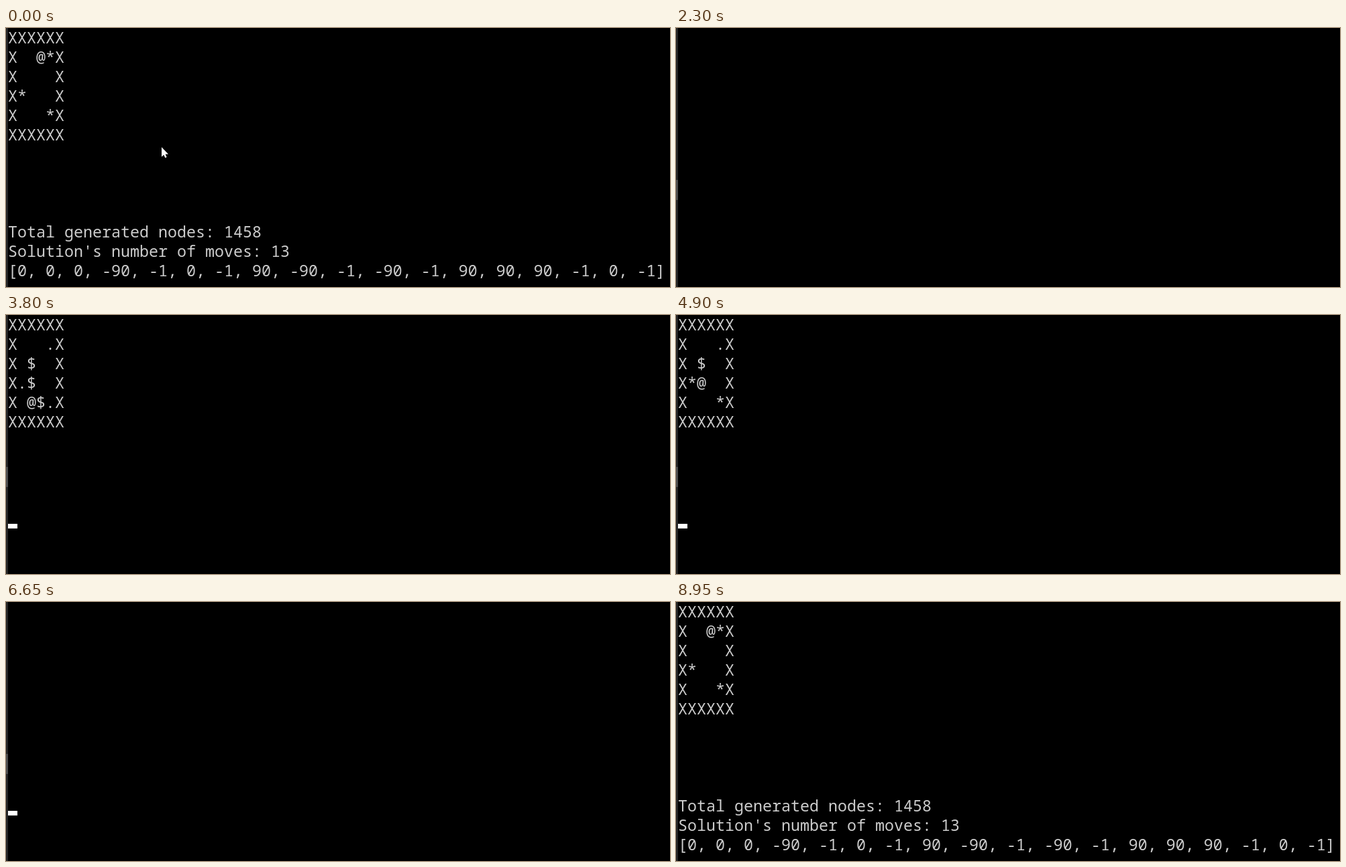
Recreate the animation shown at these times as an HTML page. Size 990x387 px, loop 9.1 s.

```html
<!DOCTYPE html>
<html lang="en">
<head>
<meta charset="utf-8">
<title>Box puzzle solver</title>
<style>
  html, body { margin: 0; width: 100%; height: 100%; overflow: hidden; background: #000; }
  svg { display: block; width: 990px; height: 387px; }
  text {
    font: 23.333px "Noto Sans Mono", "DejaVu Sans Mono", monospace;
    fill: #ccc;
    white-space: pre;
  }
</style>
</head>
<body>
<svg id="stage" viewBox="0 0 990 387">
  <rect width="990" height="387"/>
  <rect width="3" height="387" fill="#262626"/>
  <rect id="thumb" y="227" width="3" height="30" fill="#4d4d4d"/>
  <rect id="caret" x="3" y="312" width="14" height="7" fill="#fff"/>
  <g id="board"></g>
  <g id="report"></g>
  <path id="pointer" fill="#fff" d="M232 178V192.5L235.2 189.5L237.4 194L239.6 193L237.6 188.4H242Z"/>
</svg>
<script>
const LOOP = 9100;
const START = 2350;
const BLANKS = [2300, 3400, 4850, 5900, 6650];
const BLANK_LENGTH = 50;
const MOVES = [
  [2700, 'D'], [3050, 'D'], [3450, 'D'], [3800, 'R'], [4150, 'R'], [4500, 'U'],
  [4900, 'L'], [5250, 'U'], [5600, 'L'], [5950, 'U'], [6300, 'R'], [6700, 'R']
];
const STEP = { U: [0, -1], D: [0, 1], L: [-1, 0], R: [1, 0] };
const GOALS = [[4, 1], [1, 3], [4, 4]];
const REPORT = [
  'Total generated nodes: 1458',
  "Solution's number of moves: 13",
  '[0, 0, 0, -90, -1, 0, -1, 90, -90, -1, -90, -1, 90, 90, 90, -1, 0, -1]'
];

const byId = id => document.getElementById(id);
const [thumb, caret, board, report, pointer] =
  ['thumb', 'caret', 'board', 'report', 'pointer'].map(byId);

function addLine(parent, row, content = '') {
  const line = document.createElementNS('http://www.w3.org/2000/svg', 'text');
  line.setAttribute('x', 3);
  line.setAttribute('y', 23 + 29 * row);
  line.textContent = content;
  parent.append(line);
  return line;
}

function show(node, visible) {
  node.style.visibility = visible ? 'visible' : 'hidden';
}

// A player standing on a goal is drawn as the goal.
function cellAt(x, y, player, boxes) {
  if (x % 5 === 0 || y % 5 === 0) return 'X';
  const here = p => p[0] === x && p[1] === y;
  const goal = GOALS.some(here);
  if (boxes.some(here)) return goal ? '*' : '$';
  if (goal) return '.';
  return here(player) ? '@' : ' ';
}

function rowsAfter(count) {
  let player = [1, 1];
  const boxes = [[2, 2], [2, 3], [2, 4]];
  for (const [, dir] of MOVES.slice(0, count)) {
    const [dx, dy] = STEP[dir];
    player = [player[0] + dx, player[1] + dy];
    const box = boxes.find(b => b[0] === player[0] && b[1] === player[1]);
    if (box) {
      box[0] += dx;
      box[1] += dy;
    }
  }
  return Array.from({ length: 6 }, (_, y) =>
    Array.from({ length: 6 }, (_, x) => cellAt(x, y, player, boxes)).join(''));
}

const states = Array.from({ length: MOVES.length + 1 }, (_, n) => rowsAfter(n));
const lines = states[0].map((_, row) => addLine(board, row));
REPORT.forEach((content, i) => addLine(report, 10 + i, content));

let shown = -1;

function draw(t) {
  const count = t < START ? MOVES.length : MOVES.filter(([at]) => t >= at).length;
  if (count !== shown) {
    lines.forEach((line, row) => { line.textContent = states[count][row]; });
    shown = count;
  }
  show(board, !BLANKS.some(at => t >= at && t < at + BLANK_LENGTH));
  show(report, t < 2300 || t >= 6950);
  show(caret, t >= START && t < 6900);
  show(thumb, t >= 1050 && t < 8950);
  show(pointer, t < 50);
}

const origin = performance.now();
function tick() {
  draw((performance.now() - origin) % LOOP);
  requestAnimationFrame(tick);
}
tick();
</script>
</body>
</html>
```
